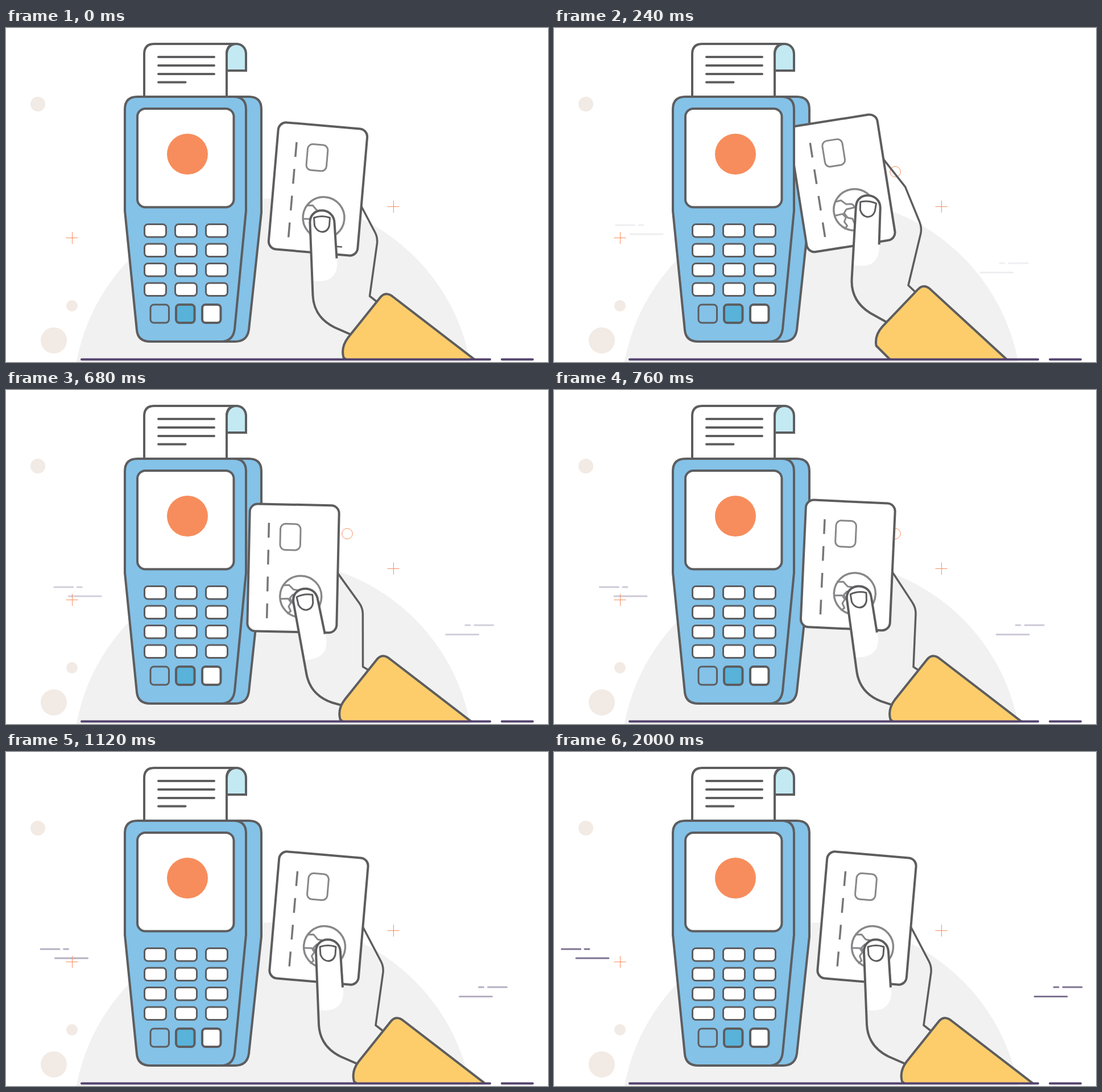
Write an HTML page that moves like this. It is 953 px wide and 588 px high and loops after 2040 ms.

```html
<!DOCTYPE html>
<html lang="en">
<head>
<meta charset="utf-8">
<title>Card payment</title>
<style>
html, body { margin: 0; width: 100%; height: 100%; overflow: hidden; background: #fff; }
svg { display: block; width: 953px; height: 588px; }
.ink { stroke: #5d5d5f; stroke-width: 4; stroke-linejoin: round; fill: none; }
.body { fill: #84c2e8; }
.white { fill: #fff; }
.thin { stroke-width: 3.5; }
.soft { stroke: #88888a; stroke-width: 3; fill: none; stroke-linejoin: round; }
.round { stroke-linecap: round; }
.orange { stroke: #f78d5c; fill: none; }
.purple { stroke: #54456f; stroke-linecap: round; fill: none; }
</style>
</head>
<body>
<svg viewBox="0 0 953 588">
  <clipPath id="floor"><rect width="953" height="583"/></clipPath>
  <circle cx="470" cy="652" r="352" fill="#f1f1f1"/>
  <g fill="#f2eae4">
    <circle cx="56" cy="134" r="13"/>
    <circle cx="116" cy="489" r="10"/>
    <circle cx="84" cy="550" r="23"/>
  </g>
  <g class="purple" stroke-width="3">
    <path id="left" d="M13.500 347h33M54 347h8M39 363h57"/>
    <path id="right" d="M879 414h8M895 414h33M845 430.500h57"/>
  </g>
  <path class="orange" d="M105.500 369.500h21M116.500 359v21M670.500 314.500h21M681.500 304v21"/>
  <circle class="orange" cx="600" cy="253" r="9.300"/>
  <path d="M545 316h14q5 0 5-3" fill="none" stroke="#2b6ca3" stroke-width="3"/>

  <path class="ink body" d="M395 121H427Q449 121 449 143V325L427 531Q424 552 403 552H370Z"/>

  <path id="fingers" class="ink thin" d="M570 248L584 263L628 309L659 368Q664 377 663 388L650 481L664 492"/>
  <g id="card">
    <rect class="ink white" x="-78.500" y="-112" width="157" height="224" rx="14"/>
    <path class="soft" d="M-44.400 -79V91" style="stroke:#77777a;stroke-width:3.500" stroke-dasharray="26 21.300"/>
    <rect class="soft" x="-24" y="-78" width="35.500" height="46" rx="9"/>
    <g class="soft" transform="translate(14.300 49.500)">
      <circle r="36.500" stroke-width="3.500"/>
      <path d="M-32-19l11-1 8 8 9 1q5 3 4 7l-14 1-5 6 5 9 8 3 3 12M-36 5l14-1 5 7-4 7 4 8-6 5"/>
    </g>
    <path class="ink" d="M36 98h15" style="stroke-width:2.500"/>
  </g>
  <g id="thumb">
    <path class="white" d="M550 455L545 352C544 323 587 323 588 352L593 414V424Q592 455 560 455Z"/>
    <path class="ink" d="M620 550L588 536Q552 518 550 480L545 352C544 323 587 323 588 352L592 414.500"/>
    <path class="ink white" style="stroke-width:3" d="M552 343Q566 338 580 343L579 357Q576 368 566 368Q557 367 553 357Z"/>
  </g>
  <g clip-path="url(#floor)">
    <path id="sleeve" class="ink" fill="#fdcd6b" style="fill:#fdcd6b" d="M900 628L700 474Q686 462 676 475L620 545Q607 562 612 580L660 620Z"/>
  </g>

  <path class="ink white" d="M243 124V46Q243 28 261 28H404Q388 29 388 46V124"/>
  <path class="ink" style="fill:#c3e9f2;stroke-linejoin:miter" d="M388 75V46C388 22 422 22 422 46V75Z"/>
  <path class="ink round" d="M268 51h98M268 66h98M268 81h98M268 95.500h47.500"/>
  <path class="ink body" d="M209 143Q209 121 231 121H400Q422 121 422 143V322L402 530Q399 552 378 552H254Q232 552 230 532L209 322Z"/>
  <rect class="ink white" x="231" y="142" width="169.500" height="173.500" rx="14"/>
  <circle cx="319" cy="222" r="36" fill="#f78d5c"/>
  <g id="keys" class="ink" style="stroke-width:3">
    <rect x="254" y="487" width="32.500" height="32" rx="6"/>
    <rect x="299" y="487" width="32.500" height="32" rx="6" fill="#58b2d9" stroke-width="4"/>
    <rect x="345" y="487" width="32.500" height="32" rx="6" fill="#fff" stroke-width="4"/>
  </g>
  <path class="purple" stroke-width="4" d="M133 583.500H851M872 583.500H926"/>
</svg>
<script>
const LOOP = 2040, STEP = 40;
const $ = id => document.getElementById(id);

for (let i = 0; i < 12; i++) {
  const x = 243.5 + i % 3 * 54, y = 345.5 + Math.floor(i / 3) * 34.5;
  $('keys').insertAdjacentHTML('beforeend',
    `<rect x="${x}" y="${y}" width="38" height="22.500" rx="6" fill="#fff"/>`);
}

// time, then x, y, angle for card, wrist and sleeve
const poses = [
  [80, 548.5, 283.5, 4.9, 639.5, 472, 0, 668.5, 469, 0],
  [240, 506.5, 273.3, -9, 623, 453, 5.5, 651, 455.5, 5],
  [400, 476.4, 324.8, -4.6, 617, 484.5, -15, 653, 469, 0],
  [760, 516.8, 308.4, 2.6, 632, 487.5, -5.5, 666.5, 469, 0],
  [940, 549, 282, 4.9, 645, 472, 0, 680, 469, 0],
  [1100, 550, 292.5, 4.9, 650, 481, 0, 687, 469, 0]
];
const last = poses.length - 1;

// Slope at a pose: flat at the ends and at turning points
function slope(i, k) {
  if (i === 0 || i === last) return 0;
  const [a, b, c] = [poses[i - 1], poses[i], poses[i + 1]];
  const p = (b[k] - a[k]) / (b[0] - a[0]), q = (c[k] - b[k]) / (c[0] - b[0]);
  return p * q <= 0 ? 0 : 2 * p * q / (p + q);
}

function value(t, k) {
  if (t <= poses[0][0]) return poses[0][k];
  if (t >= poses[last][0]) return poses[last][k];
  const i = poses.findIndex(p => p[0] > t) - 1;
  const a = poses[i], b = poses[i + 1], d = b[0] - a[0], u = (t - a[0]) / d;
  const s = u * u * (3 - 2 * u);
  return a[k] + (b[k] - a[k]) * s
    + d * u * (1 - u) * ((1 - u) * slope(i, k) - u * slope(i + 1, k));
}

function place(id, t, k, ox = 0, oy = 0) {
  $(id).setAttribute('transform', `translate(${value(t, k)} ${value(t, k + 1)}) ` +
    `rotate(${value(t, k + 2)}) translate(${-ox} ${-oy})`);
}

function drift(id, t, dir) {
  $(id).setAttribute('transform', `translate(${dir * 0.054 * (2000 - t)} 0)`);
  $(id).setAttribute('opacity', t < 80 ? 0 : t / 2650);
}

function draw(now) {
  const t = Math.floor(now % LOOP / STEP) * STEP;
  place('card', t, 1);
  place('fingers', t, 4, 650, 481);
  place('thumb', t, 4, 650, 481);
  place('sleeve', t, 7, 687, 469);
  drift('left', t, 1);
  drift('right', t, -1);
}

let start;
function tick(now) {
  start ??= now;
  draw(now - start);
  requestAnimationFrame(tick);
}
draw(0);
requestAnimationFrame(tick);
</script>
</body>
</html>
```
